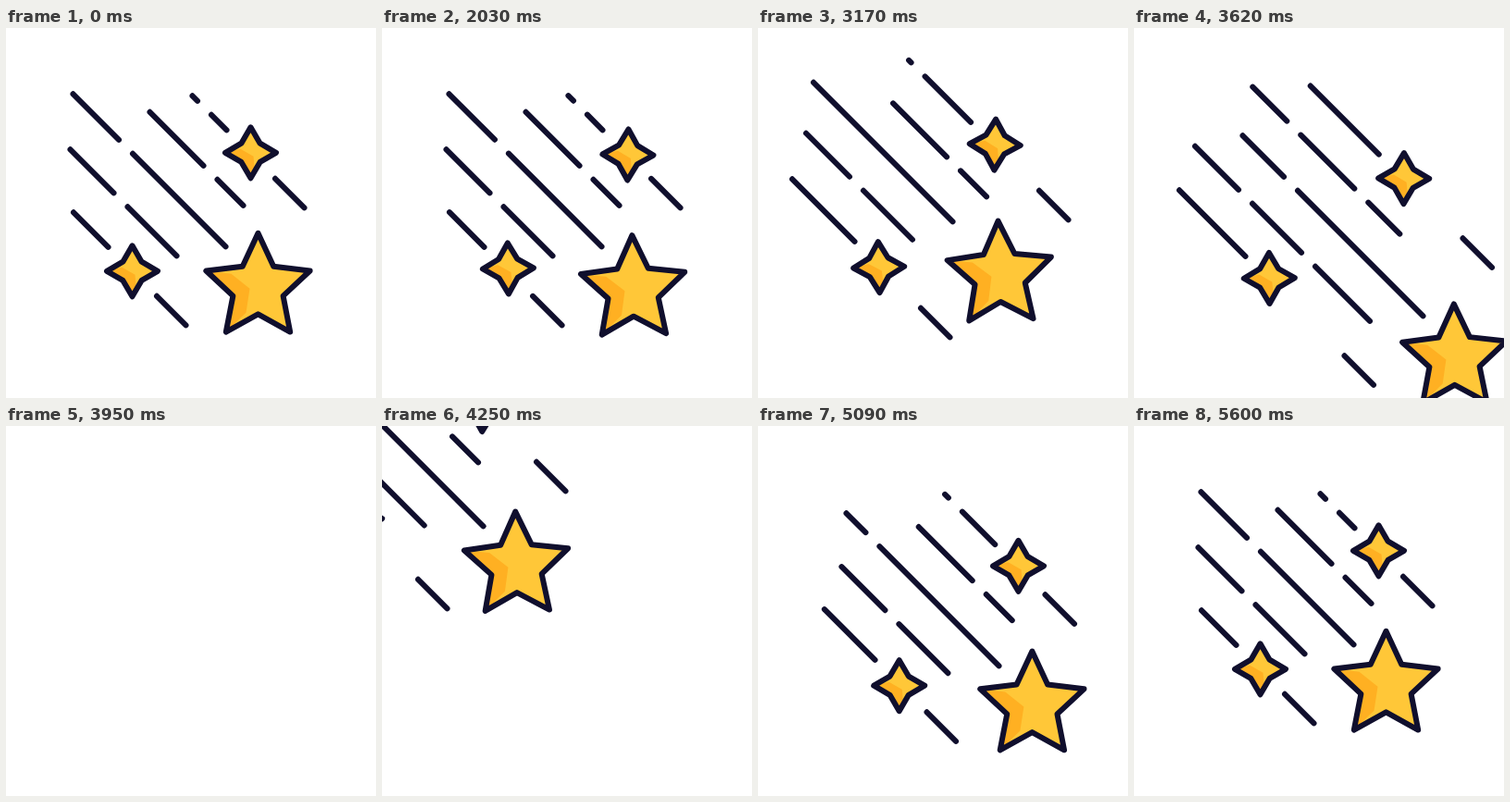
Recreate the animation shown at these times as an HTML page with a canvas. Size 400 px wide and 400 px high, loop 5660 ms.

```html
<!DOCTYPE html>
<html lang="en">
<head>
<meta charset="utf-8">
<title>Shooting stars</title>
<style>
html, body { margin: 0; width: 100%; height: 100%; overflow: hidden; background: #fff; }
canvas { display: block; width: 400px; height: 400px; }
</style>
</head>
<body>
<canvas id="stage" width="400" height="400"></canvas>
<script>
const ctx = document.getElementById('stage').getContext('2d');
const LOOP = 5660, HOLD = 2030, STEP = 30, LAST = 120, WRAP = 64;
const INK = '#100f2d', GOLD = '#ffc738', SHADE = '#ffb022', GAP = 15;

// Smooth curve through [step, value] keys, without overshoot.
function curve(keys) {
  const n = keys.length - 1;
  const slope = i => (keys[i + 1][1] - keys[i][1]) / (keys[i + 1][0] - keys[i][0]);
  const tangent = i => {
    if (i === 0) return keys[0][0] === 0 ? 0 : slope(0);
    if (i === n) return keys[n][0] === LAST ? 0 : slope(n - 1);
    const a = slope(i - 1), b = slope(i);
    return a * b <= 0 ? 0 : 2 * a * b / (a + b);
  };
  return k => {
    let i = 0;
    while (i < n - 1 && k > keys[i + 1][0]) i++;
    const [k0, v0] = keys[i], [k1, v1] = keys[i + 1];
    const d = k1 - k0, u = (k - k0) / d, w = 1 - u;
    return v0 * (1 + 2 * u) * w * w + d * tangent(i) * u * w * w
      + v1 * u * u * (3 - 2 * u) - d * tangent(i + 1) * u * u * w;
  };
}

// Pull back, fly out at the lower right, come in again from the upper left.
// lag runs from 0 (leader) to 1 (last follower).
function flight(lag, swing, drag) {
  const go = 75 - 65 * lag, enter = -128 - 36 * lag, near = -45 - 11 * lag;
  const leave = curve([[0, 0], [17, swing], [39, -12 + 6 * lag - drag], [54, go], [WRAP, go + 340]]);
  const arrive = curve([[WRAP, enter - 240], [75, enter], [89, near], [103, 23 - 7 * lag], [LAST, 0]]);
  return k => k < WRAP ? leave(k) : arrive(k);
}

function ramp(k, a, b) {
  const u = Math.min(1, Math.max(0, (k - a) / (b - a)));
  return u * u * (3 - 2 * u);
}
const hump = (k, a, b, c, d) => ramp(k, a, b) - ramp(k, c, d);
const swell = k => hump(k, 0, 39, 89, LAST);
const surge = k => hump(k, 39, 54, 64, 75);
const lead = k => hump(k, 0, 39, 75, 89);

// A trail lies on x - y = offset. grow lengthens its tail, slide moves its
// gaps backwards; both are [swell, surge] amounts.
const trail = (offset, head, length, lag, grow, slide, gap, pitch) => ({
  offset, head, length, grow, slide, gap, pitch,
  move: flight(lag, 0, 15 * (1 - lag) ** 2)
});
const trails = [
  trail(128.5, 238, 37, 0.75, [30, 7], [33, 30], 24, 200),
  trail(65, 256, 116, 0.68, [0, 43], [0, 6], 35.5, 73),
  trail(1.5, 237, 165, 0, [0, 30], [50, -15], 108, 200),
  trail(-61.5, 199, 130, 0.3, [0, 59], [0, 59], 7.5, 68),
  trail(-126, 110, 37.5, 1, [30, 4], [0, 0], Infinity, 0)
];

// Dashes ahead of the small stars.
const fronts = [{ offset: 128.5, x: 290.5 }, { offset: -126.5, x: 162.5 }];
const frontMove = flight(0.5, 0, 0);

const polar = (r, a) => [r * Math.sin(a), -r * Math.cos(a)];
const starPoints = (tips, outer, inner) => Array.from({ length: tips * 2 },
  (_, i) => polar(i % 2 ? inner : outer, i * Math.PI / tips));

const big = {
  outline: starPoints(5, 59, 28.5),
  shade: [[-56, -18], [-29, -15], [-9, 1], [-13, 27], [-35, 48], [-27, 9]]
};
const small = {
  outline: starPoints(4, 27.5, 14.3),
  shade: [[-27.5, 0], [-11, -4], [3, 4], [4, 15], [0, 27.5], [-10, 10]]
};

const star = (shape, x, y, lag, turn, shake) =>
  ({ shape, x, y, turn, shake, move: flight(lag, 37 - 21 * lag, 0) });
const stars = [
  star(big, 272, 280, 0, 1, [-1.4, 2]),
  star(small, 264, 134, 0.75, -1, [1.2, 2]),
  star(small, 136, 262, 1, 1, [-0.3, -3])
];

function trace(points) {
  ctx.beginPath();
  points.forEach(p => ctx.lineTo(...p));
  ctx.closePath();
}

function paint(points, colour) {
  trace(points);
  ctx.fillStyle = colour;
  ctx.fill();
}

function drawDash(offset, a, b) {
  if (b - a < 0.5) return;
  ctx.beginPath();
  ctx.moveTo(a, a - offset);
  ctx.lineTo(b, b - offset);
  ctx.stroke();
}

function drawTrail(t, k) {
  const amount = ([a, b]) => a * swell(k) + b * surge(k);
  const head = t.head + t.move(k);
  const length = t.length + amount(t.grow);
  let gap = t.gap + amount(t.slide), from = 0;
  while (from < length) {
    drawDash(t.offset, head - Math.min(length, gap - GAP / 2), head - from);
    from = gap + GAP / 2;
    gap += t.pitch;
  }
}

function drawFront({ offset, x }, k) {
  const a = x + frontMove(k) + 22 * lead(k);
  drawDash(offset, a, a + 31.5);
}

function drawStar({ shape, x, y, turn, shake, move }, k) {
  const moving = k > 0 && k < LAST ? 1 : 0;
  const s = move(k);
  const w = moving * Math.cos((k - 1) * Math.PI / 14);
  const tilt = -moving * turn * 1.9 * Math.cos((k - 18) * Math.PI / 10);
  ctx.save();
  ctx.translate(x + s + shake[0] * w, y + s + shake[1] * w);
  ctx.rotate(tilt * Math.PI / 180);
  paint(shape.outline, GOLD);
  paint(shape.shade, SHADE);
  trace(shape.outline);
  ctx.stroke();
  ctx.restore();
}

function draw(t) {
  const k = t < HOLD ? 0 : Math.min(LAST, Math.floor((t - HOLD) / STEP) + 1);
  ctx.setTransform(1, 0, 0, 1, 0, 0);
  ctx.fillStyle = '#fff';
  ctx.fillRect(0, 0, 400, 400);
  ctx.translate(0.5, 0.8);
  ctx.strokeStyle = INK;
  ctx.lineWidth = 6;
  ctx.lineCap = ctx.lineJoin = 'round';
  trails.forEach(d => drawTrail(d, k));
  fronts.forEach(d => drawFront(d, k));
  stars.forEach(s => drawStar(s, k));
}

const start = performance.now();
function tick() {
  draw((performance.now() - start) % LOOP);
  requestAnimationFrame(tick);
}
tick();
</script>
</body>
</html>
```
